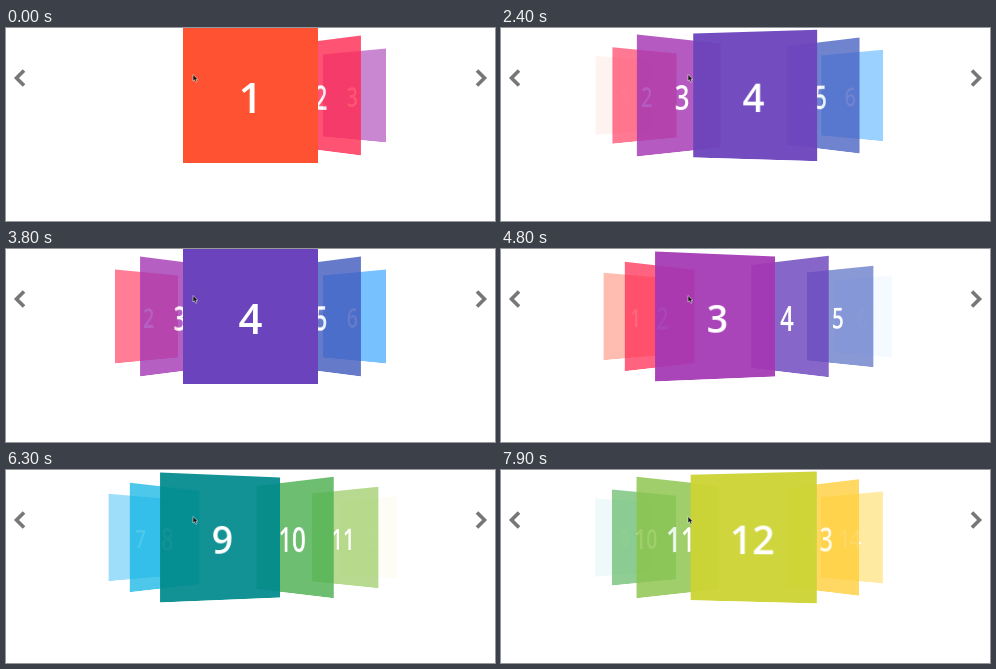
These frames come from a looping animation (489 by 193 pixels, 8000 ms). An HTML page:

```html
<!DOCTYPE html>
<html lang="en">
<head>
<meta charset="utf-8">
<title>Cover flow</title>
<style>
  html, body { margin: 0; width: 100%; height: 100%; overflow: hidden; background: #fff; }
  #stage { position: relative; width: 489px; height: 193px; overflow: hidden; }
  #flow {
    position: absolute; left: 177px; top: 0; width: 135px; height: 135px;
    perspective: 533px;
  }
  #deck { position: absolute; inset: 0; transform-style: preserve-3d; }
  .card {
    position: absolute; inset: 0; color: #fff; text-align: center;
    font: 600 42px/137px "Open Sans", "Noto Sans", sans-serif;
    font-stretch: 75%;
  }
  svg { position: absolute; inset: 0; }
</style>
</head>
<body>
<div id="stage">
  <div id="flow"><div id="deck"></div></div>
  <svg width="489" height="193">
    <g fill="none" stroke="#777" stroke-width="3.6">
      <path d="M18 42.5 L10.5 50 L18 57.5"/>
      <path d="M471 42.5 L478.5 50 L471 57.5"/>
    </g>
    <path d="M187 46.5 V53 L188.6 51.8 L189.8 54.3 L191 53.7 L189.9 51.4 L191.8 51.2 Z"
      fill="#111" stroke="#fff" stroke-width=".5"/>
  </svg>
</div>
<script>
const LOOP = 8000, TICK = 100;
const colors = ['#ff5232', '#ff2850', '#a436b4', '#6b43bc', '#3f59bd', '#1e98ff', '#03a9f4',
  '#0ab4e2', '#008a8c', '#4caf50', '#8bc34a', '#cdd434', '#ffcb30', '#ffd336'];

// [time, position in the deck]
const path = [[0, 1], [950, 1], [1500, 2.35], [1750, 3], [2250, 4], [2400, 3.88], [3000, 3],
  [3450, 3], [3800, 4], [4100, 5], [4500, 4], [4800, 3.35], [5000, 3], [6100, 10],
  [6300, 9.35], [6450, 9], [7500, 12], [7750, 12], [7900, 11.9], [8000, 11.83]];
const alphas = [1, 0.8, 0.6, 0];
const mix = (a, b, k) => a + (b - a) * k;

const cards = colors.map((color, i) => {
  const el = document.createElement('div');
  el.className = 'card';
  el.textContent = i + 1;
  el.style.background = color;
  document.getElementById('deck').append(el);
  return el;
});

function place(el, d, dir) {
  const side = Math.sign(d), a = Math.abs(d);
  if (a >= 3) { el.style.display = 'none'; return; }
  const step = Math.floor(a), q = a - step;
  const leaving = side === -dir;
  const lead = leaving ? 1 - (1 - q) ** 2.3 : q;
  const turn = step ? 1 : lead;
  const slide = leaving ? 0.81 * q + 0.19 * q ** 3 : q;
  const x = step ? 86.6 + 70.4 * (a - 1) : 86.6 * slide;
  const z = step ? 123 + 166 * (a - 1) : 123 * lead;
  el.style.display = 'block';
  el.style.opacity = mix(alphas[step], alphas[step + 1], lead);
  el.style.zIndex = 10 - Math.round(a * 3);
  el.style.transform =
    `translateX(${side * x}px) translateZ(${-z}px) rotateY(${-side * 56 * turn}deg)`;
}

function draw(ms) {
  const t = Math.floor((ms % LOOP) / TICK) * TICK;
  const n = path.findIndex(p => p[0] > t);
  const [t0, p0] = path[n - 1], [t1, p1] = path[n];
  const pos = mix(p0, p1, (t - t0) / (t1 - t0));
  const dir = Math.sign(p1 - p0);
  cards.forEach((el, i) => place(el, i + 1 - pos, dir));
}

const start = performance.now();
function loop() {
  draw(performance.now() - start);
  requestAnimationFrame(loop);
}
loop();
</script>
</body>
</html>
```
